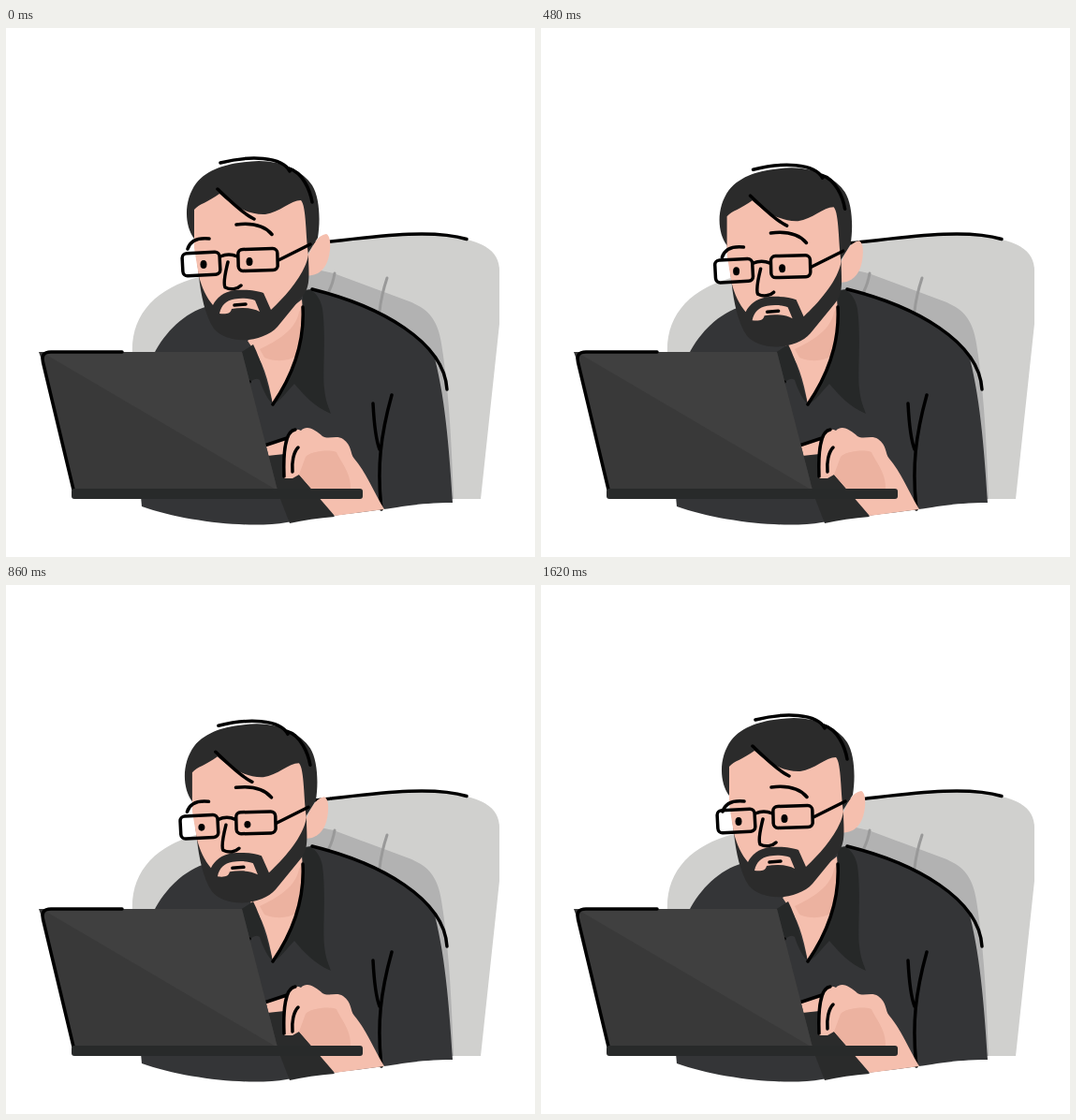
An HTML page for the animation above (1820 ms loop, 565 by 565 pixels).

```html
<!DOCTYPE html>
<html lang="en">
<head>
<meta charset="utf-8">
<title>Man at a laptop</title>
<style>
  html, body { margin: 0; width: 100%; height: 100%; overflow: hidden; background: #fff; }
  svg { display: block; width: 100vw; height: 100vh; }
  .line { fill: none; stroke: #000; stroke-width: 3.5; stroke-linecap: round; stroke-linejoin: round; }
  .seam { fill: none; stroke: #999; stroke-width: 3; stroke-linecap: round; }
  .skin { fill: #f5bfae; }
  .shade { fill: #ecb2a0; }
  .hair { fill: #2b2b2b; }
  .shirt { fill: #343537; }
  .collar { fill: #262828; }
</style>
</head>
<body>
<svg viewBox="0 0 565 565">
  <g id="chair">
    <path fill="#d0d0ce" d="M135 348C133 306 160 278 206 266L330 232C380 223 450 214 492 226C515 231 527 242 527 259V316L507 503H470L300 400Z"/>
    <path fill="#b2b2b2" d="M318 255L350 262L428 291C458 302 463 318 467 350C474 400 476 450 478 503H440L310 300Z"/>
    <path class="seam" d="M351 262Q349 273 345 281M407 267Q401 285 399 302"/>
    <path class="line" d="M329 230C380 225 450 213 492 225.500"/>
  </g>

  <g id="body">
    <path class="shirt" d="M158 348C170 325 190 304 216 297L325 279C390 294 446 324 458 353C470 400 474 460 477 507C440 507 420 512 403 514C370 519 330 522 300 528C260 535 190 527 145 511L144 500Z"/>
    <path class="skin" d="M258 334L316 290C320 330 308 370 285 402C280 375 274 355 262 340Z"/>
    <path class="shade" d="M313 303C310 322 290 334 271 343L276 352C288 357 302 356 310 350C315 335 317 315 317 298Z"/>
    <path class="collar" d="M317 283C324 275 335 284 338 300C342 330 338 368 340 385C341 398 345 406 347 412C330 405 318 392 308 380C300 388 292 400 285 402C309 370 320 330 317 297Z"/>
    <path class="collar" d="M250 347L264 338C273 355 280 385 285 402C278 395 274 385 271 376C267 373 263 376 259 380Z"/>
    <path class="line" d="M317 298C319 335 307 370 285 402M259 379L260 378M327 279C400 297 468 335 471 386M392 401C393 420 395 440 399 450M412 392C400 435 396 470 401 514"/>
    <path fill="#2a2b2b" d="M276 456H300L351 522Q325 524 303 529L288 490Z"/>
  </g>

  <g id="hand">
    <path class="skin" d="M276 447L300 437C304 429 310 427 315 430C322 423 331 430 338 436C345 440 353 434 360 439C370 446 367 454 372 460C385 475 395 500 404 514L351 521L313 477L306 481H297V455L279 457Z"/>
    <path class="shade" d="M320 458C325 452 345 450 353 453C357 463 369 475 368 493H327L313 477Z"/>
    <path class="line" d="M276 446L300 438M297 479C296 455 298 430 309 429"/>
    <path id="finger" class="line" d="M312 448C307 453 305 464 306 474"/>
  </g>

  <g id="laptop">
    <path fill="#393939" d="M35 346H252L290 494H72L39 357Z"/>
    <path fill="#404040" d="M38 346H252L290 494Z"/>
    <path class="line" d="M124 346H48C40 346 38 350 39.500 357L72 493"/>
    <rect x="70" y="492" width="311" height="11" rx="3" fill="#282a2a"/>
  </g>

  <g id="head">
    <path class="skin" d="M318 264C322 240 330 222 342 220C348 222 347 240 343 250C338 262 328 266 318 264Z"/>
    <path class="hair" d="M201 225C190 210 190 184 203 166C218 147 246 143 270 142C296 142 318 154 327 168C335 181 336 205 333 224L323 240C323 262 326 275 317 286L290 319C275 336 237 339 222 321C213 308 208 285 206 265Z"/>
    <path class="skin" d="M201 194C206 188 216 186 228 177C240 188 258 200 277 199C292 197 304 184 315 184C321 190 320 225 323 242C320 262 300 285 283 301L275 283C268 280 256 279 244 280C232 282 225 288 221 296C214 288 209 277 206 265L201 235Z"/>
    <path class="skin" d="M228 305C230 296 235 291 244 289.500C253 288 261 289 266 291L271 303C264 299 252 298 241 300C240 305 235 306 228 305Z"/>
    <path class="line" d="M244 296L256 295M229 144C260 136 295 137 303 153M302 150C317 154 325 174 327 186M226 172C238 183 252 198 265 204"/>
    <path id="brows" class="line" d="M194 236C197 226 207 224 217 225M246 210C262 208 276 211 284 220.500"/>
    <g class="line">
      <rect x="248" y="236" width="42" height="23" rx="5" transform="rotate(-1.500 269 247)"/>
      <rect x="188.500" y="240" width="40" height="24" rx="5" transform="rotate(-3 208 252)"/>
      <path d="M229 244Q238 240 247 244M291 248L325 231M237 250C234 262 232 273 234 277C240 280 247 279 251 275"/>
    </g>
    <ellipse class="eye" cx="211" cy="252.500" rx="3.500" ry="4.500"/>
    <ellipse class="eye" cx="260" cy="249.500" rx="3.500" ry="4.500"/>
  </g>
</svg>
<script>
  const LOOP = 1820, STEP = 20, LAST = 1620;

  // [time in ms, value]
  const nod = [[0, 0], [220, 3.1], [480, 7.2], [620, 9.1], [680, 9], [860, 6.3], [1060, 2.6], [1200, 0.7], [1320, 0]];
  const frown = [[0, 0], [220, 2.2], [480, 1.8], [620, -1], [860, 0], [1060, 3.5], [1320, 6]];
  const lid = [[800, 1], [860, 0.85], [1020, 0.16], [1080, 0.16], [1220, 1]];
  const tap = [[560, 0], [860, 3], [1060, 6], [1320, 0]];

  function at(keys, t) {
    if (t <= keys[0][0]) return keys[0][1];
    for (let i = 1; i < keys.length; i++) {
      const [t0, v0] = keys[i - 1], [t1, v1] = keys[i];
      if (t < t1) return v0 + (v1 - v0) * (t - t0) / (t1 - t0);
    }
    return keys[keys.length - 1][1];
  }

  const byId = id => document.getElementById(id);
  const head = byId('head'), brows = byId('brows'), finger = byId('finger');
  const eyes = document.querySelectorAll('.eye');
  const move = (el, x, y) => el.setAttribute('transform', `translate(${x} ${y})`);

  function draw(t) {
    const dy = at(nod, t);
    move(head, -dy / 3, dy);
    move(brows, dy / 4, at(frown, t));
    move(finger, 0, at(tap, t));
    eyes.forEach(e => e.setAttribute('ry', 4.5 * at(lid, t)));
  }

  const start = performance.now();
  function tick(now) {
    const t = Math.max(0, now - start) % LOOP;
    draw(Math.min(LAST, Math.floor(t / STEP) * STEP));
    requestAnimationFrame(tick);
  }
  draw(0);
  requestAnimationFrame(tick);
</script>
</body>
</html>
```
